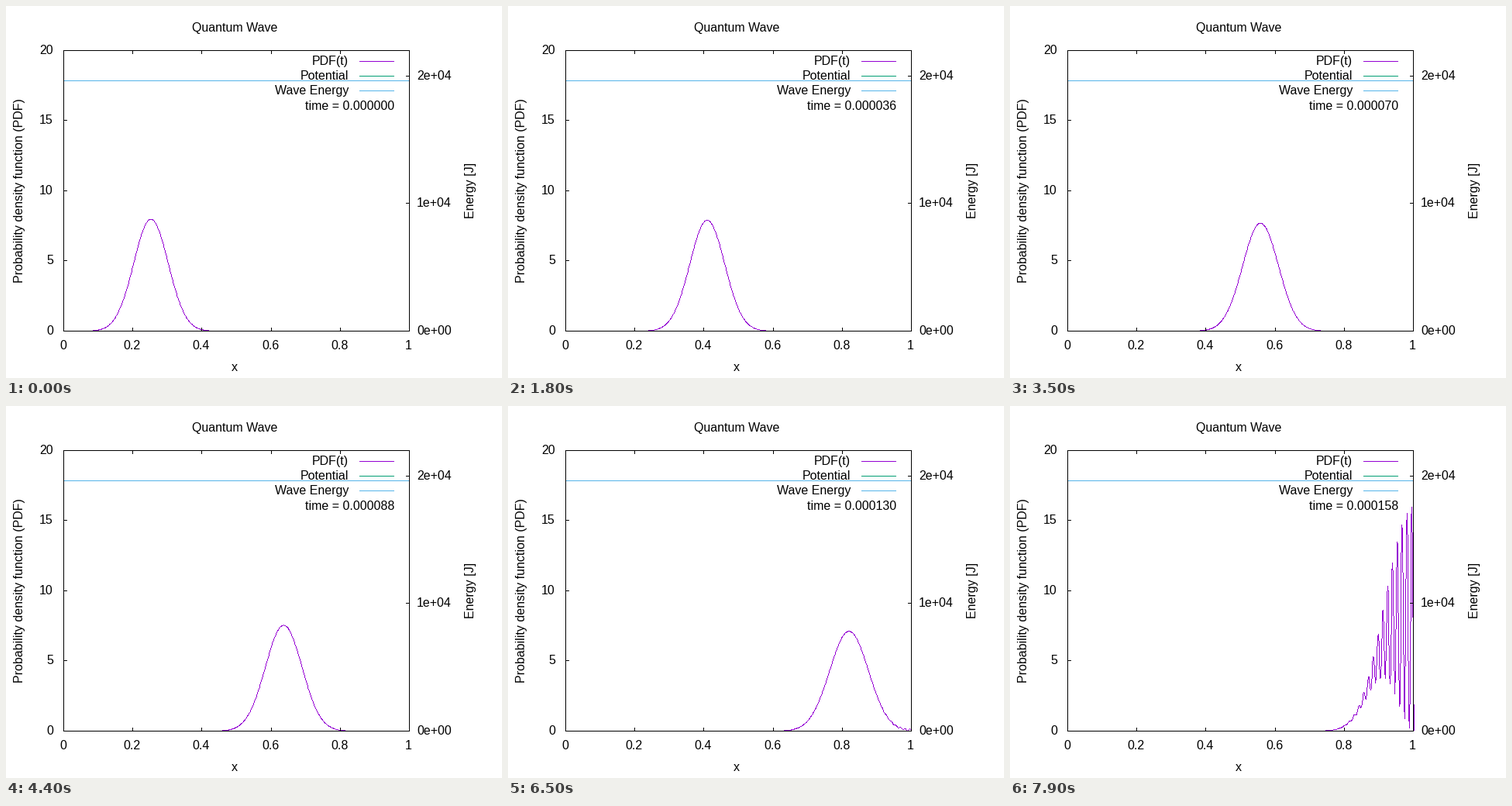
A matplotlib script for the animation above (8000 ms loop, 640 px wide and 480 px high).

```python
import numpy as np
import matplotlib.pyplot as plt
from matplotlib.animation import FuncAnimation

W, H, DPI = 640, 480, 100
PX = 72 / DPI                      # one pixel in points
FRAMES, INTERVAL = 80, 100
DT = 2e-6                          # simulated time per frame

LEFT, RIGHT, TOP, BOTTOM = 74, 520, 57, 419
TICK = 4
PURPLE, GREEN, BLUE = "#9400d3", "#009e73", "#56b4e9"

plt.rcParams["font.family"] = "Liberation Sans"
plt.rcParams["font.size"] = 16 * PX


def wave_density(times, n=1000, k0=220.0, x0=0.25, sigma=0.05, hbar_m=20.0):
    """Gaussian packet between hard walls, solved on a grid by sine modes."""
    dx = 1 / n
    i = np.arange(n + 1)
    j = np.arange(1, n)
    x = i * dx
    modes = np.sin(np.pi * np.outer(i, j) / n)
    psi = np.exp(-((x - x0) ** 2) / (4 * sigma**2) + 1j * k0 * x)
    psi /= np.sqrt(np.sum(abs(psi) ** 2) * dx)
    coef = 2 / n * (modes.T @ psi)
    omega = hbar_m * (1 - np.cos(np.pi * j / n)) / dx**2
    psi_t = modes @ (coef[:, None] * np.exp(-1j * np.outer(omega, times)))
    return x, abs(psi_t.T) ** 2


def nearest(v):
    return np.floor(v + 0.5)


def px_x(x):
    return LEFT + nearest(x * (RIGHT - LEFT))


def px_y(y, top):
    return BOTTOM - nearest(y / top * (BOTTOM - TOP))


def trace(x, y):
    """Whole pixels along a polyline, one per step of the longer axis."""
    dx, dy = np.diff(x), np.diff(y)
    steps = np.maximum(abs(dx), abs(dy)).astype(int)
    seg = np.repeat(np.arange(len(steps)), steps)
    first = np.cumsum(steps) - steps
    f = (np.arange(len(seg)) - first[seg]) / steps[seg]
    return nearest(x[seg] + f * dx[seg]), nearest(y[seg] + f * dy[seg])


fig = plt.figure(figsize=(W / DPI, H / DPI), dpi=DPI, facecolor="white")
ax = fig.add_axes([0, 0, 1, 1])
ax.set_xlim(0, W)
ax.set_ylim(H, 0)
ax.axis("off")


def line(xs, ys, color="black", z=3):
    ax.plot(np.array(xs) + 0.5, np.array(ys) + 0.5, color=color, lw=PX,
            antialiased=False, snap=False, solid_capstyle="projecting",
            solid_joinstyle="miter", zorder=z)


def label(x, y, s, ha="center", **kw):
    return ax.text(x, y, s, ha=ha, va="baseline", zorder=4, **kw)


# Frame and ticks
line([LEFT, RIGHT, RIGHT, LEFT, LEFT], [TOP, TOP, BOTTOM, BOTTOM, TOP])

for v in np.arange(6) / 5:
    x = px_x(v)
    line([x, x], [BOTTOM, BOTTOM - TICK])
    line([x, x], [TOP, TOP + TICK])
    label(x - 0.5, 443, f"{v:g}")

for v in range(0, 21, 5):
    y = px_y(v, 20)
    line([LEFT, LEFT + TICK], [y, y])
    label(61, y + 5, str(v), "right")

for v in (0, 1e4, 2e4):
    y = px_y(v, 22000)
    line([RIGHT, RIGHT - TICK], [y, y])
    label(530, y + 5, f"{v:.0e}", "left")

# Titles
label(295.5, 33, "Quantum Wave")
label(295, 471, "x")
side = dict(rotation=90, rotation_mode="anchor")
label(22, 238, "Probability density function (PDF)", **side)
label(604, 238, "Energy [J]", **side)

# Key
key = (("PDF(t)", PURPLE), ("Potential", GREEN), ("Wave Energy", BLUE))
for row, (name, color) in enumerate(key):
    y = 71 + 19 * row
    line([456, 500], [y, y], color)
    label(442, y + 5, name, "right")
clock = label(386, 134, "", "left")

# Data
energy_y = px_y(19630, 22000)
line([LEFT, RIGHT], [energy_y, energy_y], BLUE, 2)
grid, density = wave_density(DT * np.arange(FRAMES))
grid_x = px_x(grid)
curve, = ax.plot([], [], ",", color=PURPLE, zorder=1)


def update(n):
    x, y = trace(grid_x, px_y(density[n], 20))
    curve.set_data(x + 0.5, y + 0.5)
    clock.set_text(f"time = {n * DT:.6f}")
    return curve, clock


anim = FuncAnimation(fig, update, frames=FRAMES, interval=INTERVAL,
                     repeat=True, repeat_delay=0)
plt.show()
```
